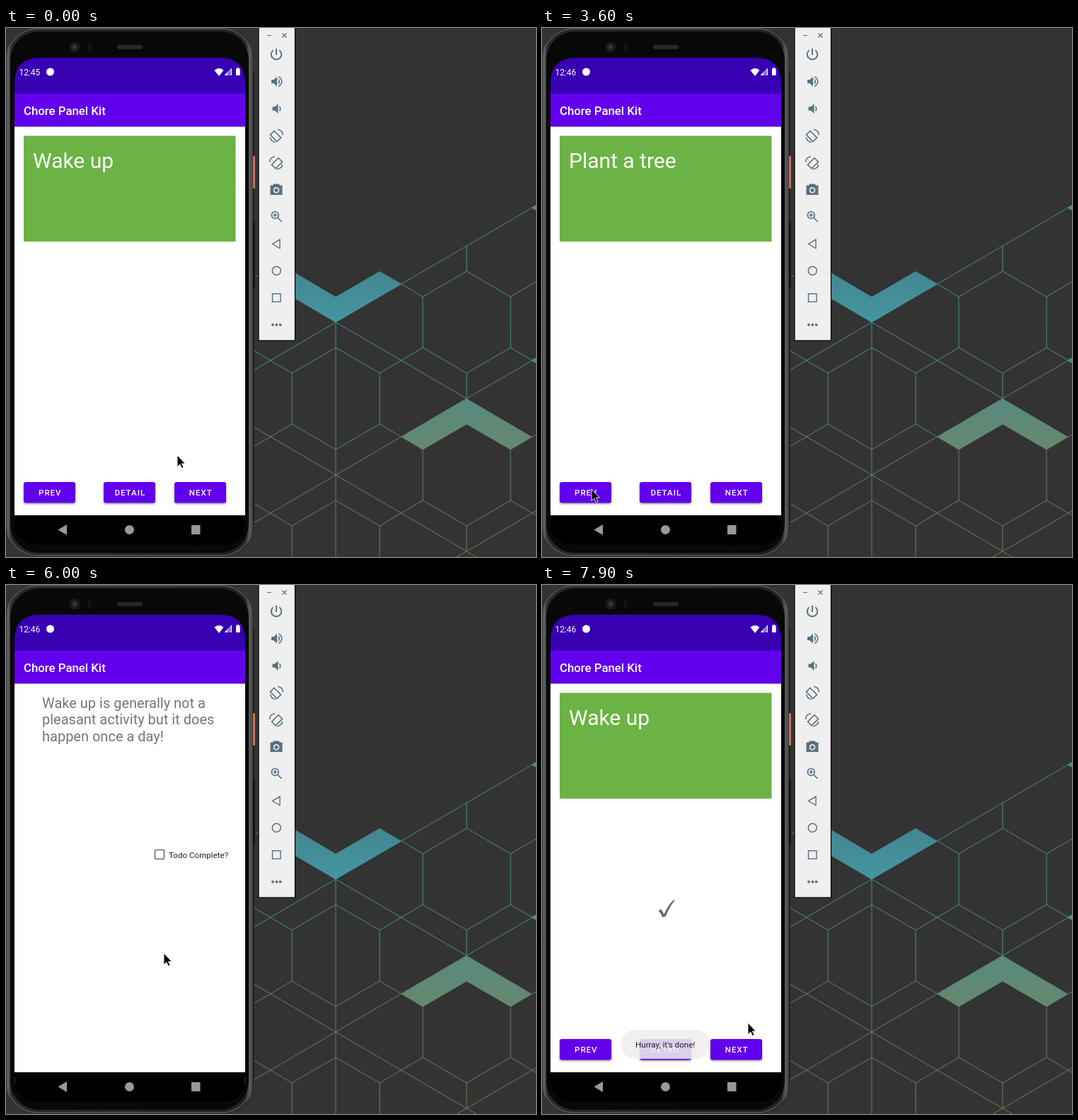
Recreate the animation shown at these times as an HTML page. Size 749x748 px, loop 8000 ms.

```html
<!DOCTYPE html>
<html lang="en">
<head>
<meta charset="utf-8">
<title>Task list demo</title>
<style>
html, body { margin: 0; width: 100%; height: 100%; overflow: hidden; background: #333; }
svg { display: block; width: 749px; height: 748px; font-family: Roboto, "Open Sans", sans-serif; }
.lines { fill: none; stroke: url(#wire); stroke-width: 1; }
.tools { fill: none; stroke: #57707f; stroke-width: 1.6; }
.tools .solid { fill: #57707f; stroke: none; }
.title { font-size: 16.8px; font-weight: 500; fill: #fff; }
.task { font-size: 30px; fill: #fff; }
.note { font-size: 20px; fill: #757575; }
.label { font-size: 11.5px; font-weight: 500; letter-spacing: 1.02px; fill: #fff; text-anchor: middle; }
.small { font-size: 11.6px; fill: #222; }
</style>
</head>
<body>
<svg viewBox="0 0 749 748">
  <defs>
    <linearGradient id="wire" gradientUnits="userSpaceOnUse" x1="0" y1="250" x2="0" y2="748">
      <stop offset="0" stop-color="#468891"/><stop offset=".4" stop-color="#4a8e8e"/>
      <stop offset=".65" stop-color="#5d8471"/><stop offset="1" stop-color="#7d7650"/>
    </linearGradient>
    <linearGradient id="teal" x2="0" y2="1"><stop stop-color="#43868f"/><stop offset="1" stop-color="#4396a3"/></linearGradient>
    <linearGradient id="sage" x2="0" y2="1"><stop stop-color="#568a81"/><stop offset="1" stop-color="#67886d"/></linearGradient>
    <linearGradient id="rim"><stop stop-color="#1a1a1a"/><stop offset=".008" stop-color="#6c6c6c"/>
      <stop offset=".02" stop-color="#2a2a2a"/><stop offset=".97" stop-color="#222"/>
      <stop offset=".988" stop-color="#606060"/><stop offset="1" stop-color="#181818"/></linearGradient>
    <clipPath id="screen"><path d="M12 78Q12 42 48 42H302Q338 42 338 78V695Q338 731 302 731H48Q12 731 12 695Z"/></clipPath>
    <filter id="soft" x="-20%" y="-30%" width="140%" height="190%"><feGaussianBlur stdDeviation="1.6"/></filter>
  </defs>

  <rect width="749" height="748" fill="#333"/>
  <g class="lines" id="mesh"></g>
  <path fill="url(#teal)" d="M405 344L466 380 528 344 559 362 466 416 405 380Z"/>
  <path fill="url(#sage)" d="M651 524L743 578 713 596 651 560 589 596 559 578Z"/>
  <path fill="#438d97" d="M742 254l7-4v8zM742 470l7-4v8z"/>

  <g>
    <rect x="348" y="62" width="3" height="640" fill="#222"/>
    <rect x="349" y="181" width="3" height="46" rx="1" fill="#d0705c"/>
    <rect x="349" y="275" width="3" height="92" rx="1" fill="#161616"/>
    <rect x="0" y="0" width="349" height="748" rx="44" fill="url(#rim)"/>
    <rect x="1.5" y="1" width="346" height="745" rx="43" fill="none" stroke="#5a5a5a" stroke-width="1.4"/>
    <rect x="6" y="5" width="337" height="737" rx="40" fill="#080808"/>
    <circle cx="97" cy="27" r="8" fill="#171717"/><circle cx="97" cy="27" r="4.5" fill="#292929"/>
    <circle cx="97" cy="27" r="1.8" fill="#454545"/><ellipse cx="118" cy="27" rx="3" ry="7" fill="#111"/>
    <rect x="157" y="24" width="36" height="6" rx="3" fill="#272727"/>
  </g>

  <g clip-path="url(#screen)">
    <rect x="12" y="42" width="326" height="689"/>
    <g id="list">
      <g id="frame">
        <rect x="12" y="42" width="326" height="689"/>
        <rect x="12" y="42" width="326" height="51.5" fill="#3700b3"/>
        <rect x="12" y="93" width="326" height="46.5" fill="#6200ee"/>
        <rect x="12" y="139.5" width="326" height="549.5" fill="#fff"/>
        <text class="title" x="25" y="123">Chore Panel Kit</text>
      </g>
      <rect x="25" y="152.5" width="299.5" height="149.5" fill="#6cb345"/>
      <text class="task" id="task1" x="38" y="198"></text>
      <text class="task" id="task2" x="38" y="233"></text>
      <path id="tick" fill="#6d6d6d" d="M164.500 460.500q3-3 5-.5l3 5.500q5-12 12.500-19.500 1.500-.8 2.500 0-7.500 9.500-12.500 22-2.500 2.500-5 1.200-2-5-5.500-8.700z"/>
      <g id="buttons"></g>
    </g>
    <g id="detail">
      <use href="#frame"/>
      <text class="note"><tspan x="51" y="174">Wake up is generally not a</tspan><tspan x="51" y="197.300">pleasant activity but it does</tspan><tspan x="51" y="220.600">happen once a day!</tspan></text>
      <rect x="210.500" y="374.500" width="13" height="13" rx="1.500" fill="#fff" stroke="#6b6b6b" stroke-width="1.600"/>
      <g id="checked"><rect x="209.700" y="373.700" width="14.600" height="14.600" rx="2" fill="#03dac5"/>
        <path d="M212 381l3.500 3.500 6.500-7" fill="none" stroke="#fff" stroke-width="1.700"/></g>
      <text class="small" x="230" y="385.500">Todo Complete?</text>
    </g>
    <g fill="#fff">
      <text id="clock" x="18.500" y="66.500" font-size="11.900"></text>
      <circle cx="62.500" cy="62" r="5.500"/>
      <path d="M301 68l-6.500-8.200q6.500-5.400 13 0zM319 56.500V67H308.500z"/>
      <path d="M313 67v-4l5-5v9z" fill="#3700b3" opacity=".55"/>
      <path d="M325 57.500h1.300v-1.300h3v1.300h1.400V67H325z"/>
    </g>
    <g fill="#999">
      <path d="M73.500 709.500L86 702v15z"/><circle cx="174.500" cy="709.500" r="6.500"/><rect x="262" y="703" width="12.500" height="13"/>
    </g>
    <g id="toast">
      <rect x="111.500" y="629" width="126.500" height="41" rx="20.500" fill="#eee" opacity=".87"/>
      <text class="small" x="132" y="654">Hurray, it's done!</text>
    </g>
  </g>

  <g class="tools">
    <rect x="357" y="-2" width="51.500" height="444" fill="#efefef" stroke="#080808" stroke-width="1.300"/>
    <path stroke-width="1.200" d="M369 10.500h6M390.500 7.500l6 6M396.500 7.500l-6 6"/>
    <path stroke-width="1.900" d="M382 29v9M377.600 31.400a7.300 7.300 0 1 0 8.800 0"/>
    <g id="horn"><path class="solid" d="M375 73.200h3.500l4.500-4.500v14l-4.500-4.500H375z"/></g>
    <path d="M385 72.500q2.500 3.300 0 6.600M385.500 68.700q8.500 7 0 14"/>
    <use href="#horn" x="1.500" y="38.300"/><path d="M386.500 111q2.500 3.200 0 6.400"/>
    <g id="turn"><path d="M379 145.500l9.500 9.500-5.500 5.500-9.500-9.500zM384 143.500q7 1 7.500 8M381 161.500q-7-1-7.500-7"/></g>
    <use href="#turn" transform="translate(764 38.300) scale(-1 1)"/>
    <path class="solid" fill-rule="evenodd" d="M378.500 220.500h7l1.700 2h3.300v13.500h-17v-13.500h3.300zM382 225a4.300 4.300 0 1 0 .01 0z"/>
    <circle class="solid" cx="382" cy="229.300" r="2.600"/>
    <circle cx="380.300" cy="264.500" r="5"/><path d="M384 268.200l5.500 5.500M377.500 264.500h5.600M380.300 261.700v5.600"/>
    <path stroke-width="1.400" d="M376.500 305.300l10.500-6.200v12.400z"/><circle cx="382.300" cy="343.300" r="6" stroke-width="1.400"/>
    <rect x="376.500" y="375.700" width="11.500" height="11.500" stroke-width="1.400"/>
    <g class="solid"><circle cx="377" cy="419.700" r="1.900"/><circle cx="382.300" cy="419.700" r="1.900"/><circle cx="387.600" cy="419.700" r="1.900"/></g>
  </g>
  <path id="cursor" d="M0 0V16.500L3.800 13 6.400 18.500 9 17.300 6.500 12H11.300Z" fill="#000" stroke="#fff" stroke-width=".9"/>
</svg>
<script>
const LOOP = 8000, STEP = 100;
const $ = id => document.getElementById(id);

// Wallpaper: pointy hexagons plus the long slanted lines joining them
const hex = (x, y) => `M${x} ${y - 72}l62 36v72l-62 36l-62 -36v-72z`;
const mesh = [[651, 416], [466, 524], [651, 632], [466, 740]].map(p => hex(...p)).join("") +
  "M466 416L749 251M350 348L466 416 651 524 749 467M350 484L466 416M651 524L466 632 350 700M350 564L466 632 651 740 749 683M651 740l-14 8M651 740l14 8" +
  "M651 308v36M651 488v36M651 704v36M466 416V748" +
  "M528 488l61-36M404 488l-54-32M528 560l61 36M404 560l-54 32M589 380l-30-18M713 380l36-21M713 452l36 21M713 596l36-21M713 668l36 21M589 668l-61 36M404 704l-54-32";
$("mesh").innerHTML = `<path d="${mesh}"/>`;

const buttons = [["PREV", 25], ["DETAIL", 138], ["NEXT", 238]];
$("buttons").innerHTML = buttons.map(([name, x], i) => `
  <clipPath id="edge${i}"><rect x="${x}" y="642" width="73" height="29.5" rx="3"/></clipPath>
  <rect id="shade${i}" x="${x}" y="643.5" width="73" height="29.5" rx="3" filter="url(#soft)"/>
  <rect x="${x}" y="642" width="73" height="29.5" rx="3" fill="#6200ee"/>
  <text class="label" x="${x + 37.3}" y="661">${name}</text>
  <g id="wave${i}" clip-path="url(#edge${i})" fill="#fff"></g>`).join("");

const wake = ["Wake up", ""], sleep = ["Go to sleep", ""],
  laugh = ["Make at least one", "person laugh"], tree = ["Plant a tree", ""];
const tasks = [[0, wake], [1300, sleep], [1700, laugh], [2200, tree], [3800, laugh], [4200, sleep], [4700, wake]];

// button, press time, time the ripple starts to fade, centre
const taps = [
  [2, 1300, 1500, 272, 651], [2, 1700, 1900, 272, 651], [2, 2200, 2900, 272, 651],
  [0, 3800, 4200, 70, 656], [0, 4200, 4500, 70, 656], [0, 4700, 4900, 70, 656],
  [1, 5500, 5700, 189, 661]
];

// time, x, y of the pointer tip
const path = [
  [0, 242, 604], [200, 268, 630], [300, 268, 630], [500, 269, 630], [700, 269, 630],
  [800, 342, 735], [900, 180, 374], [1000, 35, 600], [1100, 270, 646], [2900, 270, 646],
  [3600, 70, 652], [4700, 70, 652], [5000, 273, 706], [5300, 189, 661], [5700, 189, 661],
  [6300, 257, 380], [6700, 257, 380], [7200, 201, 601], [7600, 287, 651], [7800, 287, 651], [7900, 291, 619]
];

const clamp = v => Math.max(0, Math.min(1, v));
const ramp = (t, from, to) => clamp((t - from) / (to - from));
const easeOut = p => 1 - (1 - p) ** 2;

function pointAt(t) {
  const i = path.findIndex(k => k[0] > t);
  if (i < 0) return path[path.length - 1].slice(1);
  const a = path[i - 1], b = path[i], p = ramp(t, a[0], b[0]);
  return [a[1] + (b[1] - a[1]) * p, a[2] + (b[2] - a[2]) * p];
}

function place(id, scale, alpha) {
  const el = $(id);
  el.setAttribute("transform", `translate(175 386.5) scale(${scale}) translate(-175 -386.5)`);
  el.setAttribute("opacity", alpha);
}

function drawButtons(t) {
  buttons.forEach((_, i) => {
    const live = taps.filter(k => k[0] === i && t >= k[1] && t < k[2] + 200);
    const raised = live.some(k => t - k[1] < 200);
    $("shade" + i).setAttribute("y", raised ? 646.5 : 643.5);
    $("shade" + i).setAttribute("opacity", raised ? .38 : .42);
    $("wave" + i).innerHTML = live.map(([, start, fade, x, y]) => {
      const age = t - start, r = age < 200 ? 29 + age * .22 : 90;
      return `<circle cx="${x}" cy="${y}" r="${r}" opacity="${.24 * (1 - ramp(t, fade, fade + 200))}"/>`;
    }).join("");
  });
}

function draw(t) {
  const [x, y] = pointAt(t);
  $("cursor").setAttribute("transform", `translate(${x} ${y})`);
  const lines = tasks.filter(k => k[0] <= t).pop()[1];
  $("task1").textContent = lines[0];
  $("task2").textContent = lines[1];
  $("clock").textContent = t < 3200 ? "12:45" : "12:46";
  drawButtons(t);

  const open = easeOut(ramp(t, 5600, 5900)), close = easeOut(ramp(t, 6700, 7000));
  place("list", 1 + .05 * (open - close), 1);
  place("detail", t < 6700 ? .85 + .15 * open : 1 - .1 * close, t < 6700 ? clamp(open * 2) : clamp(1 - close * 1.4));
  $("checked").setAttribute("opacity", t >= 6500 ? 1 : 0);
  $("tick").setAttribute("opacity", t >= 6700 ? 1 : 0);
  $("toast").setAttribute("opacity", ramp(t, 6800, 7000));
}

const begin = performance.now();
let last = -1;
function tick() {
  const t = Math.floor((performance.now() - begin) % LOOP / STEP) * STEP;
  if (t !== last) draw(last = t);
  requestAnimationFrame(tick);
}
tick();
</script>
</body>
</html>
```
